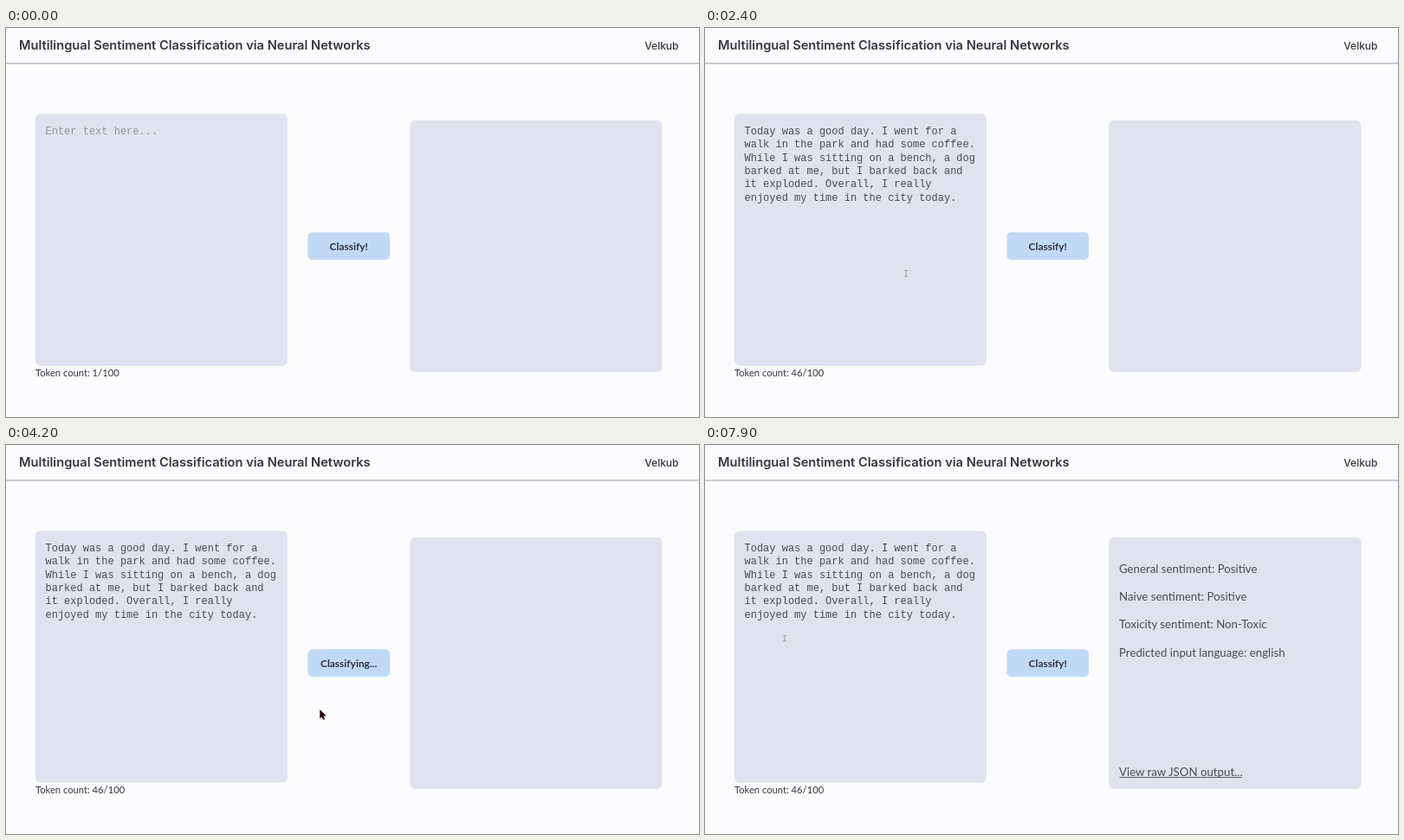
Animation, 800 px wide and 450 px high, one loop 8000 ms. Source, as an HTML page:

```html
<!DOCTYPE html>
<html lang="en">
<head>
<meta charset="utf-8">
<title>Sentiment classification</title>
<style>
  html, body { margin: 0; width: 100%; height: 100%; overflow: hidden; background: #fcfcfe; }
  svg { display: block; width: 100vw; height: 100vh; }
  .head { font-family: Inter, sans-serif; fill: #37373c; }
  .mono { font: 12px "Liberation Mono", monospace; fill: #4c4c53; }
  .body { font: 13.25px Lato, sans-serif; fill: #4c4c54; }
  .panel { fill: #e1e2f0; }
</style>
</head>
<body>
<svg viewBox="0 0 800 450" xmlns="http://www.w3.org/2000/svg">
  <rect width="800" height="450" fill="#fcfcfe"/>
  <rect y="40.2" width="800" height="1.4" fill="#bababd"/>
  <text class="head" x="15" y="25.3" font-size="14.65" font-weight="600">Multilingual Sentiment Classification via Neural Networks</text>
  <text class="head" x="776.5" y="24.6" font-size="12" font-weight="500" text-anchor="end">Velkub</text>

  <rect class="panel" x="33.8" y="99.3" width="291.2" height="291.4" rx="6"/>
  <rect class="panel" x="466.3" y="106.8" width="291.2" height="291.2" rx="6"/>

  <text id="hint" class="mono" x="45.5" y="123" style="fill:#96969d">Enter text here...</text>
  <g id="typed" class="mono"></g>
  <rect id="caret" x="290.6" y="189" width="0.8" height="14" fill="#77777e"/>
  <text id="count" class="body" x="34" y="402.6" style="font-size:11.2px;fill:#36363c"></text>

  <rect id="button" x="348.3" y="236.2" width="94.8" height="32" rx="5.5"/>
  <text id="label" class="body" x="395.7" y="256.8" text-anchor="middle" style="font-size:11.9px;font-weight:700;fill:#2f3340"></text>

  <g id="results" class="body">
    <rect x="478.5" y="384" width="141" height="0.9"/>
    <text x="478" y="382.8">View raw JSON output...</text>
  </g>

  <g id="pointer">
    <path id="arrow" d="M.3 0V10.4L2.5 8.4L4.4 12L6.2 11.1L4.5 7.5H7.8Z" fill="#2b0714"/>
    <path id="beam" d="M-1.8 -3.4H-.6L0 -2.9L.6 -3.4H1.8M0 -2.9V2.9M-1.8 3.4H-.6L0 2.9L.6 3.4H1.8" fill="none" stroke="#87847c" stroke-width=".8"/>
    <path id="hand" d="M-2 -4.2Q-1 -5.4 -.2 -4.2V-1.4L2.6 -.8Q4 -.4 3.8 1.2L3.2 4Q2.8 5 1.8 5H-.8Q-1.8 5 -2.4 3.8L-4 1Q-4 -.4 -2 .8Z" fill="#4a3444" stroke="#332430" stroke-width=".6"/>
  </g>
</svg>
<script>
const LOOP = 8000, STEP = 100;
const $ = id => document.getElementById(id);
const show = (id, on) => $(id).setAttribute("visibility", on ? "visible" : "hidden");

const story = [
  "Today was a good day. I went for a",
  "walk in the park and had some coffee.",
  "While I was sitting on a bench, a dog",
  "barked at me, but I barked back and",
  "it exploded. Overall, I really",
  "enjoyed my time in the city today."
];
const verdicts = [
  "General sentiment: Positive",
  "Naive sentiment: Positive",
  "Toxicity sentiment: Non-Toxic",
  "Predicted input language: english"
];

function addLines(id, lines, x, y, gap) {
  lines.forEach((line, i) => {
    const el = document.createElementNS("http://www.w3.org/2000/svg", "text");
    el.setAttribute("x", x);
    el.setAttribute("y", y + i * gap);
    el.textContent = line;
    $(id).append(el);
  });
}
addLines("typed", story, 45.5, 123, 15.3);
addLines("results", verdicts, 478, 147.5, 32.4);

// Pointer stops: time, x, y
const path = [
  [300, 3, 354], [600, 70, 325], [1100, 138, 291], [2000, 138, 291],
  [2400, 232, 284], [2800, 361, 266], [2900, 363, 265.5], [3100, 363, 265.5],
  [3400, 360, 299], [4200, 362, 306], [4900, 362, 306], [5200, 364.3, 310],
  [5700, 364.3, 310], [6100, 240, 262], [6600, 2, 180]
];
// Hover strength: time, amount
const hover = [[2600, 0], [2800, 1], [3100, 1], [3400, 0.12], [3600, 0]];

function track(stops, t) {
  if (t <= stops[0][0]) return stops[0].slice(1);
  const i = stops.findIndex(s => s[0] > t);
  if (i < 0) return stops[stops.length - 1].slice(1);
  const a = stops[i - 1], b = stops[i];
  const k = (t - a[0]) / (b[0] - a[0]);
  return a.slice(1).map((v, n) => v + (b[n + 1] - v) * k);
}

function drawPointer(t) {
  const back = t >= 7900;
  const on = back || (t >= 300 && t < 6600);
  const [x, y] = back ? [92, 223.5] : track(path, t);
  const inText = x > 34 && x < 325 && y > 99 && y < 391;
  const onButton = x > 348 && x < 443 && y > 236 && y < 268;
  $("pointer").setAttribute("transform", `translate(${x} ${y})`);
  show("beam", on && inText);
  show("hand", on && onButton);
  show("arrow", on && !inText && !onButton);
}

function draw(t) {
  const pasted = t >= 1300;
  show("hint", !pasted);
  show("typed", pasted);
  show("caret", pasted && t < 1900);
  $("count").textContent = `Token count: ${t < 1900 ? 1 : 46}/100`;

  const busy = t >= 3100 && t < 4700;
  const [h] = track(hover, t);
  const mix = (a, b) => Math.round(a + (b - a) * h);
  $("button").setAttribute("fill", `rgb(${mix(192, 146)},${mix(218, 201)},${mix(245, 242)})`);
  $("label").textContent = busy ? "Classifying..." : "Classify!";
  show("results", t >= 4700);
  drawPointer(t);
}

function tick() {
  const t = performance.now() % LOOP;
  draw(Math.floor(t / STEP) * STEP);
  requestAnimationFrame(tick);
}
tick();
</script>
</body>
</html>
```
